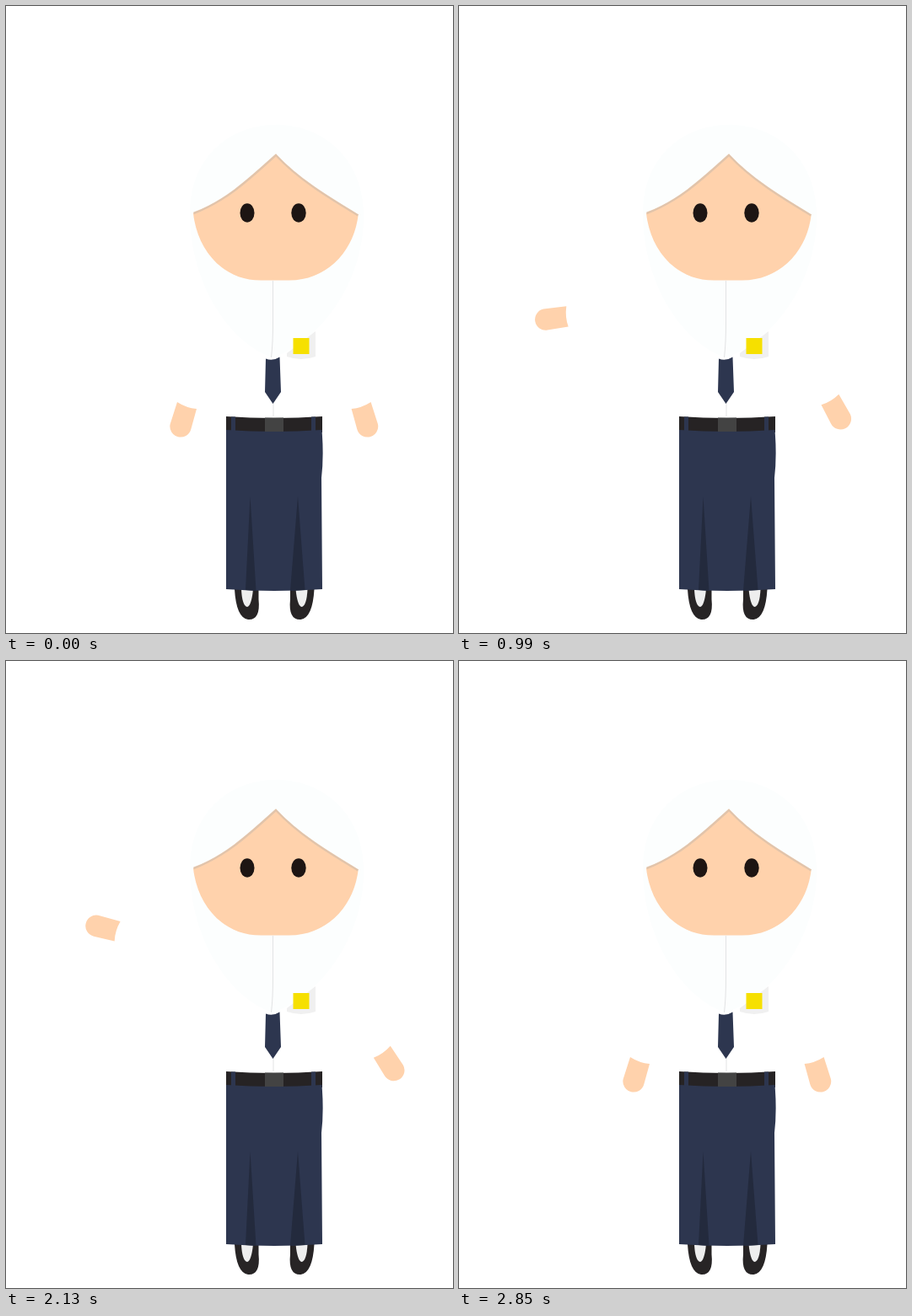
Write an HTML page that moves like this. It is 530 by 744 pixels and loops after 3300 ms.

```html
<!DOCTYPE html>
<html>
<head>
<meta charset="utf-8">
<style>
  html, body { margin: 0; width: 100%; height: 100%; overflow: hidden; background: #fff; }
  svg { display: block; width: 100vw; height: 100vh; }
</style>
</head>
<body>
<svg viewBox="0 0 530 744">
  <path fill="#fcfefe" d="M218 246C218 105 424 105 424 250C424 330 370 400 316 417C265 400 218 330 218 246Z"/>

  <!-- face -->
  <path fill="#ffd2ac" d="M320 177C290 204 262 232 222 246C227 291 258 325.500 302 325.500H336C380 325.500 412 292 417.500 249C380 227 346 205 320 177Z"/>
  <path fill="none" stroke="#e2c4aa" stroke-width="2.500" d="M222.500 246C262 231 290 204 320 177C346 205 380 226 417.500 248.500"/>
  <g fill="#1d1513">
    <ellipse cx="286" cy="245.500" rx="8.500" ry="11.200"/>
    <ellipse cx="347" cy="245.500" rx="8.700" ry="11.200"/>
  </g>

  <!-- shirt -->
  <path fill="none" stroke="#e2e3e4" d="M316.500 326V375Q316.500 400 314.500 417M317 472V487"/>
  <path fill="#2d364f" d="M308 418.500Q316 422 324.500 416.500L326 458L316.500 472L307 458Z"/>
  <path fill="#f0f0f0" d="M333 412L367 386V416Q350 422 333 416Z"/>
  <rect x="340.500" y="394" width="19" height="19" fill="#f6e000"/>

  <!-- shoes -->
  <g id="shoe">
    <path fill="#272425" d="M271 692Q273 726 287 728Q302 729 299.500 704V692Z"/>
    <path fill="#eee" d="M279 692Q280 712 286 713Q291 712 293 692Z"/>
  </g>
  <use href="#shoe" transform="translate(636.500 0) scale(-1 1)"/>

  <!-- skirt and belt -->
  <path fill="#262324" d="M261 487Q318 491 375 487V506H261Z"/>
  <path fill="#2d364f" d="M261 503Q318 507 374.500 503Q377 535 374 560L375 692Q318 696 261 692Z"/>
  <path fill="#2d364f" d="M267 487.500H272V505H267ZM362 487.500H367V505H362Z"/>
  <rect x="307" y="488.500" width="22" height="16.500" fill="#434343"/>
  <path fill="#232a3d" d="M289.500 582L284 693L296.500 694ZM346 582L337 694L354.500 693Z"/>

  <g fill="#ffd2ac">
    <path id="left"/>
    <path id="right"/>
  </g>
</svg>
<script>
const LOOP = 3300, STEP = 30;
const left = document.getElementById('left');
const right = document.getElementById('right');

const ease = (t, from, to) => {
  const u = Math.min(1, Math.max(0, (t - from) / (to - from)));
  return (1 - Math.cos(Math.PI * u)) / 2;
};

// Point turned around the wrist by an angle in degrees
function turn(x, y, deg) {
  const a = deg * Math.PI / 180, c = Math.cos(a), s = Math.sin(a);
  const dx = x - 213.2, dy = y - 475.8;
  return `${213.2 + dx * c - dy * s} ${475.8 + dx * s + dy * c}`;
}

// The fingers bend fully, the cuff follows by half
function hand(bend) {
  const cuff = bend / 2;
  return `M${turn(203, 470, cuff)}L${turn(194.7, 496, bend)}` +
    `A12.7 12.7 0 0 0 ${turn(219.3, 502.3, bend)}` +
    `L${turn(226, 478, cuff)}Q${turn(214, 477, cuff)} ${turn(203, 470, cuff)}Z`;
}

function draw(t) {
  const lift = ease(t, 590, 1190) - ease(t, 2160, 2760);
  const waving = t > 1170 && t < 2150;
  const bend = waving ? 21 * (1 - Math.cos((t - 1170) / 490 * 2 * Math.PI)) : 0;
  left.setAttribute('d', hand(bend));
  left.setAttribute('transform', `rotate(${87 * lift + 0.08 * bend} 254 354)`);
  right.setAttribute('transform',
    `rotate(${-16 * lift} 397 381) translate(635.6 0) scale(-1 1)`);
}

right.setAttribute('d', hand(0));
const start = performance.now();
function frame() {
  const t = (performance.now() - start) % LOOP;
  draw(Math.floor(t / STEP) * STEP);
  requestAnimationFrame(frame);
}
frame();
</script>
</body>
</html>
```
